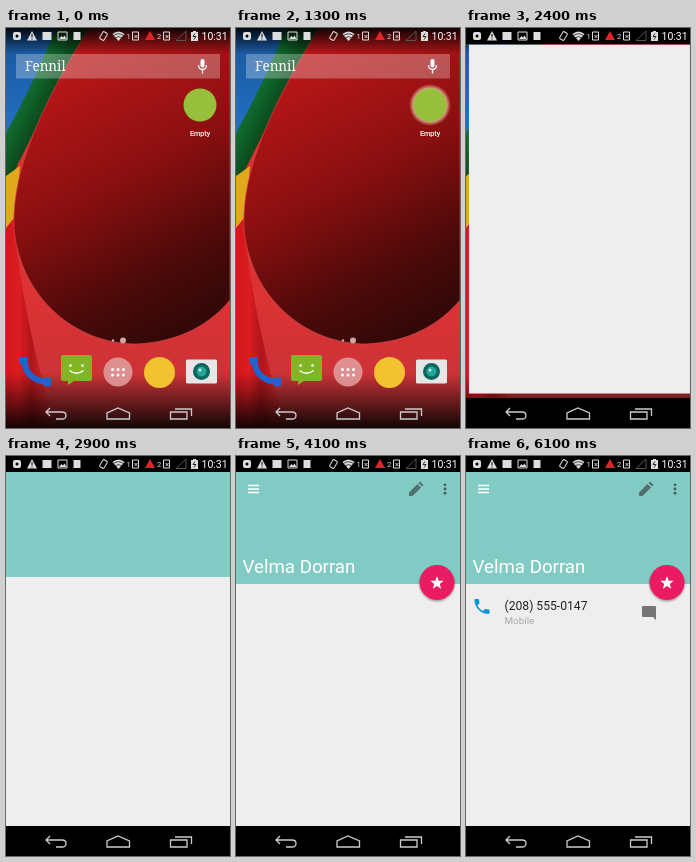
An HTML page that plays this animation: 224x400 px, repeating every 8000 ms.

```html
<!DOCTYPE html>
<html lang="en">
<head>
<meta charset="utf-8">
<title>Opening a contact card</title>
<style>
  html, body { margin: 0; width: 100%; height: 100%; overflow: hidden; background: #000; }
  svg { display: block; width: 100%; height: 100%; font-family: Roboto, sans-serif; }
</style>
</head>
<body>
<svg viewBox="0 0 224 400">
  <defs>
    <linearGradient id="disc" gradientUnits="userSpaceOnUse" x1="60" y1="30" x2="200" y2="290">
      <stop offset="0" stop-color="#bd1719"/>
      <stop offset=".45" stop-color="#8a0f10"/>
      <stop offset=".8" stop-color="#4a0909"/>
      <stop offset="1" stop-color="#330808"/>
    </linearGradient>
    <linearGradient id="blue" x1="0" y1="0" x2="0" y2="1">
      <stop offset="0" stop-color="#17559b"/>
      <stop offset="1" stop-color="#2470c4"/>
    </linearGradient>
    <linearGradient id="green" gradientUnits="userSpaceOnUse" x1="12" y1="60" x2="42" y2="75">
      <stop offset="0" stop-color="#147a35"/>
      <stop offset="1" stop-color="#0b4a1d"/>
    </linearGradient>
    <linearGradient id="paper" gradientUnits="userSpaceOnUse" x1="0" y1="270" x2="0" y2="400">
      <stop offset="0" stop-color="#dc3234"/>
      <stop offset="1" stop-color="#c23338"/>
    </linearGradient>
    <linearGradient id="fold" gradientUnits="userSpaceOnUse" x1="0" y1="0" x2="42" y2="0">
      <stop offset="0" stop-color="#d3161c"/>
      <stop offset=".3" stop-color="#dc1d22"/>
      <stop offset=".6" stop-color="#b0151a"/>
      <stop offset="1" stop-color="#cf2a2d"/>
    </linearGradient>
    <linearGradient id="fade" x1="0" y1="0" x2="0" y2="1">
      <stop offset="0" stop-color="#000" stop-opacity="0"/>
      <stop offset="1" stop-color="#000" stop-opacity=".9"/>
    </linearGradient>
    <radialGradient id="halo">
      <stop offset=".75" stop-color="#fff6c8" stop-opacity=".75"/>
      <stop offset="1" stop-color="#fff6c8" stop-opacity="0"/>
    </radialGradient>
    <filter id="shadow" x="-30%" y="-30%" width="160%" height="160%">
      <feDropShadow dx="0" dy="1.2" stdDeviation="1" flood-opacity=".4"/>
    </filter>
    <path id="sim" d="M-3-4H3V4H-3ZM-1-1 2 2M2-1-1 2" fill="none" stroke="#ddd"/>
  </defs>

  <!-- Wallpaper -->
  <rect width="224" height="400" fill="url(#paper)"/>
  <path d="M0 0H90L30 100 0 160Z" fill="url(#green)"/>
  <path d="M0 0H50Q28 55 0 105Z" fill="url(#blue)"/>
  <path d="M0 148 14 138 9 200 0 205Z" fill="#e2a81c"/>
  <path d="M0 200 8 190C12 250 26 320 50 400H0Z" fill="url(#fold)"/>
  <path d="M83 0C40 70 5 140 8 200C14 270 70 316 130 316C175 314 205 295 224 272V0Z" fill="url(#disc)" stroke="#d0504c" stroke-width=".6"/>
  <rect y="345" width="224" height="55" fill="url(#fade)"/>
  <rect width="224" height="26" fill="url(#fade)" transform="matrix(1 0 0 -1 0 26)"/>

  <!-- Launcher -->
  <rect x="10" y="26" width="204" height="24.500" rx="1" fill="#fff" fill-opacity=".28"/>
  <text x="19" y="43" font-family="'Noto Serif', serif" font-size="13.5" fill="#fff">Fennil</text>
  <g fill="none" stroke="#fff" stroke-width="1.3">
    <rect x="194.500" y="31" width="4" height="8.500" rx="2" fill="#fff" stroke="none"/>
    <path d="M192.500 37Q192.500 41.500 196.500 41.500T200.500 37M196.500 41.500V45.500"/>
  </g>
  <circle id="glow" cx="194" cy="77" r="21" fill="url(#halo)"/>
  <circle cx="194" cy="77" r="16.5" fill="#96bf3b"/>
  <text x="194" y="108" font-size="7.2" text-anchor="middle" fill="#fff" stroke="#fff" stroke-width=".2">Empty</text>
  <circle cx="107" cy="312.5" r="1.2" fill="#d9a5a5"/>
  <circle cx="117" cy="312.5" r="3" fill="#d0a5a5"/>

  <g fill="none" stroke="#1f62d0">
    <path d="M18 332Q20 352 41 354" stroke-width="6"/>
    <path d="M17.500 329V336M38 354H45" stroke-width="8.500"/>
  </g>
  <path d="M57 327H84Q86 327 86 329V351Q86 353 84 353H68L62 357V353H57Q55 353 55 351V329Q55 327 57 327Z" fill="#82b526"/>
  <g fill="#fff"><circle cx="64.500" cy="337.500" r="1.300"/><circle cx="76.500" cy="337.500" r="1.300"/></g>
  <path d="M63.500 342.500Q70.500 348 77.500 342.500" fill="none" stroke="#fff" stroke-width="1.500"/>
  <circle cx="112" cy="344" r="14.5" fill="#e2a0a0" fill-opacity=".85"/>
  <path d="M106.5 341.5H118M106.5 347H118" stroke="#fff" stroke-width="3" stroke-linecap="round" stroke-dasharray="0 5.5"/>
  <circle cx="153.5" cy="344.5" r="15.5" fill="#f2c230"/>
  <rect x="180" y="331.5" width="31" height="24" rx="1.5" fill="#e6e6e6"/>
  <circle cx="195.5" cy="343.5" r="8.5" fill="#0d665e"/>
  <circle cx="195.5" cy="343.5" r="5" fill="#24a596"/>
  <circle cx="194" cy="342" r="1.5" fill="#c8eee8"/>

  <!-- Contact app -->
  <path id="bars" d="M0 0H224V16H0ZM0 370H224V400H0Z"/>
  <rect id="window" fill="#eee"/>
  <rect id="header" y="16" width="224" fill="#82cbc4"/>
  <path data-pop="17 33 2900 3200" d="M12 29.5H23M12 33H23M12 36.5H23" stroke="#fff" stroke-width="1.5"/>
  <text data-pop="64 111 3000 3400" x="6.5" y="117" font-size="18.7" fill="#fff">Velma Dorran</text>
  <path data-pop="180 33 3100 3400" d="M173 40V36.5L181.5 28 185 31.5 176.5 40ZM182.5 27 184 25.5 187.5 29 186 30.5Z" fill="#50706d"/>
  <g data-pop="209 33 3100 3400" fill="#435f5d">
    <circle cx="209" cy="28.8" r="1.4"/><circle cx="209" cy="33" r="1.4"/><circle cx="209" cy="37.2" r="1.4"/>
  </g>
  <g data-pop="201 126.5 3500 4000">
    <circle cx="201" cy="126.5" r="17.5" fill="#e91e63" filter="url(#shadow)"/>
    <path id="star" fill="#fff"/>
  </g>
  <g data-pop="16 150.5 4400 4800">
    <path transform="translate(5.9 140.4) scale(.84)" fill="#0b96d2" d="M6.62 10.79c1.44 2.83 3.76 5.14 6.59 6.59l2.2-2.2c.27-.27.67-.36 1.02-.24 1.12.37 2.33.57 3.57.57.55 0 1 .45 1 1V20c0 .55-.45 1-1 1-9.39 0-17-7.61-17-17 0-.55.45-1 1-1h3.5c.55 0 1 .45 1 1 0 1.25.2 2.45.57 3.57.11.35.03.74-.25 1.02l-2.2 2.2z"/>
  </g>
  <text data-pop="80.5 149.5 4950 5350" x="38.5" y="154" font-size="12.15" fill="#222">(208) 555-0147</text>
  <text data-pop="54 164 5300 5650" x="38.5" y="168" font-size="9.9" fill="#aaa">Mobile</text>
  <path data-pop="183 157 5650 6100" d="M177 150H189Q190 150 190 151V164L187 161H177Q176 161 176 160V151Q176 150 177 150Z" fill="#757575"/>

  <!-- Status and navigation icons -->
  <g fill="#ddd">
    <rect x="7" y="4" width="8" height="8" rx="2"/>
    <circle cx="11" cy="8" r="1.5" fill="#000"/>
    <path d="M26 3 31 12.5H21Z"/>
    <path d="M26 6V9.5M26 10.5V11.5" stroke="#000"/>
    <rect x="36.5" y="4" width="9" height="8"/>
    <path d="M52 4H61V12H52Z" fill="none" stroke="#ddd"/>
    <path d="M53 11 55.5 8 57 9.5 58.5 7.5 60.5 11Z"/>
    <rect x="67.5" y="4" width="7" height="8"/>
    <rect x="95" y="4" width="5" height="8" rx="1" transform="rotate(30 97.5 8)" fill="none" stroke="#ddd"/>
    <path d="M106.5 6Q112.5 1 118.5 6L112.5 13Z"/>
    <path d="M107.5 7.5Q112.5 4 117.5 7.5M109.5 9.7Q112.5 7.5 115.5 9.7" fill="none" stroke="#000" stroke-width=".7"/>
    <text x="120.5" y="11" font-size="7.5">1</text>
    <use href="#sim" x="129.5" y="8"/>
    <path d="M144 3 149 12H139Z" fill="#e22424"/>
    <text x="151" y="11" font-size="7.5">2</text>
    <use href="#sim" x="160.5" y="8"/>
    <path d="M170 12.5H180V3Z" fill="none" stroke="#555"/>
    <path d="M185 4H187V3H190V4H192V13H185Z"/>
    <path d="M189 5.5 187 8.5H190L188 11.5" fill="none" stroke="#000" stroke-width=".8"/>
    <text x="195.5" y="12" font-size="10.5" fill="#fff">10:31</text>
  </g>
  <g fill="none" stroke="#ccc" stroke-width="1.3">
    <path d="M44 380 40 384 44 388M40 384H56Q60 384 60 387.5T56 391H50"/>
    <path d="M101 391V385L112 380 123.5 385V391Z"/>
    <path d="M164.5 384H181V391H164.5ZM169 381H185.5V388"/>
  </g>
</svg>
<script>
  const LOOP = 8000, STEP = 100;
  const $ = id => document.getElementById(id);
  const pops = [...document.querySelectorAll('[data-pop]')].map(el => {
    const [cx, cy, start, end] = el.dataset.pop.split(' ').map(Number);
    return { el, cx, cy, start, end };
  });

  const progress = (t, start, end) => Math.min(1, Math.max(0, (t - start) / (end - start)));
  const easeOut = (u, power = 2) => 1 - (1 - u) ** power;
  const lerp = (a, b, u) => a + (b - a) * u;
  const setAttrs = (el, attrs) => Object.entries(attrs).forEach(([k, v]) => el.setAttribute(k, v));

  const starPoints = Array.from({ length: 10 }, (_, i) => {
    const r = i % 2 ? 2.9 : 7, a = (i / 5 - 0.5) * Math.PI;
    return `${201 + r * Math.cos(a)} ${127 + r * Math.sin(a)}`;
  });
  $('star').setAttribute('d', `M${starPoints.join('L')}Z`);

  function render(t) {
    $('glow').setAttribute('opacity', t >= 1200 ? 1 : 0);

    const u = progress(t, 2200, 2500), p = easeOut(u, 3.6);
    const left = lerp(153, 0, p), right = lerp(222, 224, p);
    const top = lerp(53, 16, p), bottom = lerp(136, 370, p);
    setAttrs($('window'), {
      x: left, y: top, width: right - left, height: bottom - top,
      opacity: t < 2200 ? 0 : Math.min(1, 0.12 + 2 * u)
    });
    $('bars').setAttribute('opacity', Math.min(1, 2 * u));
    $('header').setAttribute('height', 112 * easeOut(progress(t, 2600, 3000)));

    for (const { el, cx, cy, start, end } of pops) {
      const s = easeOut(progress(t, start, end));
      setAttrs(el, {
        visibility: s > 0 ? 'visible' : 'hidden',
        transform: `translate(${cx} ${cy}) scale(${s}) translate(${-cx} ${-cy})`
      });
    }
  }

  const origin = performance.now();
  function tick() {
    const t = (performance.now() - origin) % LOOP;
    render(Math.floor(t / STEP) * STEP);
    requestAnimationFrame(tick);
  }
  tick();
</script>
</body>
</html>
```
